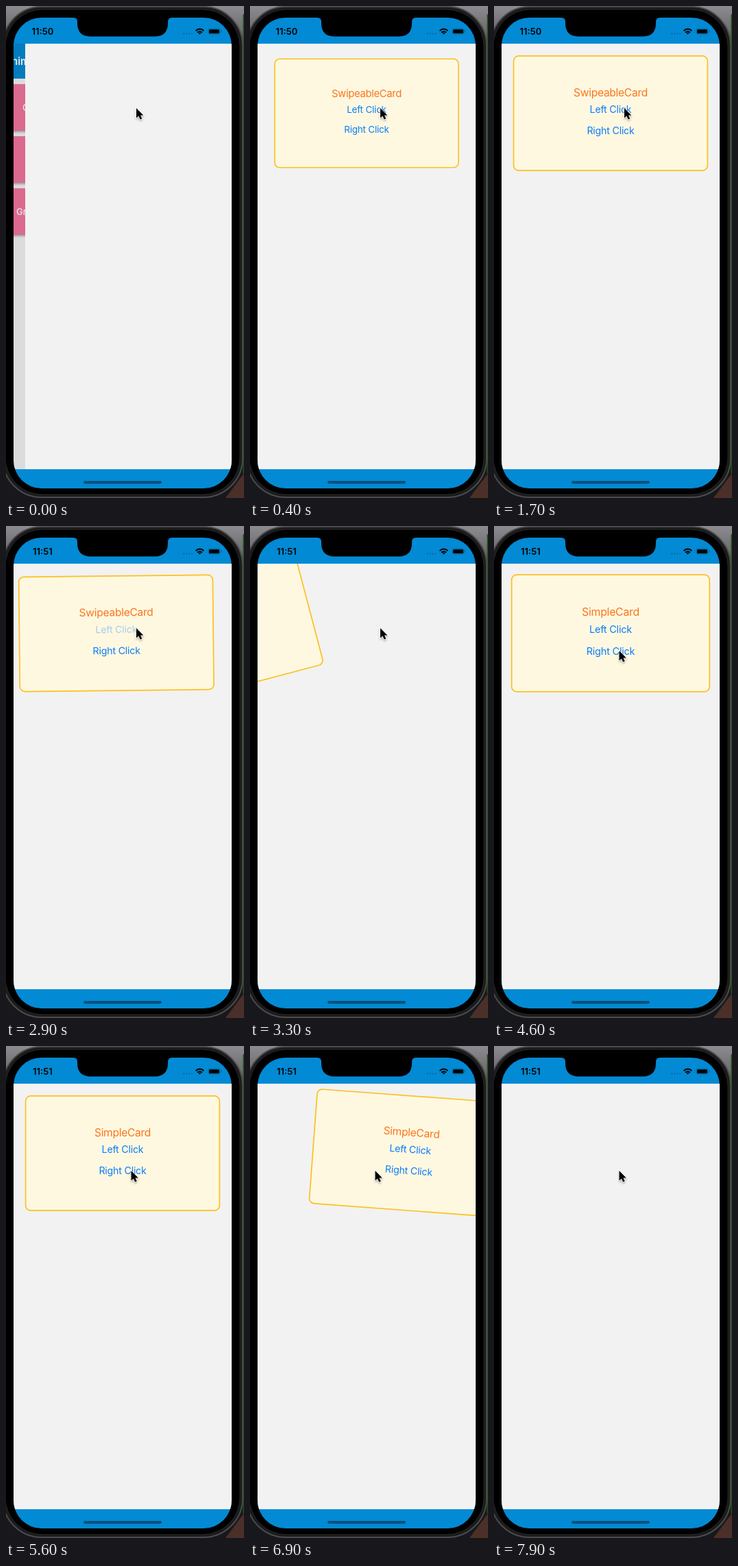
An HTML page for the animation above (8 s loop, 347x718 px).

```html
<!DOCTYPE html>
<html lang="en">
<head>
<meta charset="utf-8">
<title>Swipe cards</title>
<style>
  html, body { margin: 0; width: 100%; height: 100%; overflow: hidden; background: #000; }
  svg { display: block; width: 347px; height: 718px; font-family: Inter, Roboto, sans-serif; }
  #card text { text-anchor: middle; fill: #0a7cfa; font-size: 14.2px; letter-spacing: -.2px; }
  #card #title { fill: #fa761b; font-size: 15.6px; letter-spacing: -.3px; }
  #clock { font-size: 13px; font-weight: 600; text-anchor: middle; }
  #menu text { fill: #e9e9e9; font-weight: 500; font-size: 13px; }
</style>
</head>
<body>
<svg viewBox="0 0 347 718">
  <defs>
    <linearGradient id="backdrop" x2="0" y2="1">
      <stop offset="0" stop-color="#8c8c90"/><stop offset=".08" stop-color="#5a5a5e"/>
      <stop offset=".5" stop-color="#222"/><stop offset="1" stop-color="#17181d"/>
    </linearGradient>
    <clipPath id="screen"><rect x="11" y="17" width="318" height="687" rx="41"/></clipPath>
    <clipPath id="content"><rect x="11" y="55" width="318" height="621"/></clipPath>
    <filter id="shadow" x="-20%" y="-20%" width="140%" height="150%">
      <feDropShadow dx="0" dy="2" stdDeviation="1.5" flood-opacity=".3"/>
    </filter>
  </defs>

  <!-- device -->
  <rect width="347" height="718" fill="url(#backdrop)"/>
  <path d="M347 682V718H320Z" fill="#4a3029"/>
  <rect x="345.5" y="12" width="1.5" height="670" fill="#1f5513"/>
  <rect x="-5" y="1" width="350" height="716" rx="57" fill="#1b1b1c" stroke="#4b4b4d" stroke-width="2"/>
  <rect x="-1" y="5" width="342" height="708" rx="54" stroke="#29292a"/>

  <g clip-path="url(#screen)">
    <rect x="11" y="17" width="318" height="687" fill="#038ad4"/>
    <g clip-path="url(#content)">
      <g id="menu">
        <rect x="11" y="55" width="318" height="621" fill="#dcdcdc"/>
        <rect x="11" y="55" width="318" height="51" fill="#037cbe"/>
        <g fill="#db6b8f" filter="url(#shadow)">
          <rect x="-20" y="114" width="300" height="68"/>
          <rect x="-20" y="190" width="300" height="68"/>
          <rect x="-20" y="266" width="300" height="68"/>
        </g>
        <text x="8" y="86" style="font-size:15px;font-weight:600">nim</text>
        <text x="24" y="153">G</text>
        <text x="15" y="305">Gr</text>
      </g>
      <rect id="page" x="11" y="55" width="318" height="621" fill="#f2f2f2"/>
      <g id="card">
        <rect x="-141.4" y="-83.6" width="282.8" height="167.2" rx="7.5" fill="#fff8e1" stroke="#fcc021" stroke-width="1.7"/>
        <text id="title" y="-25"></text>
        <text id="left" y="-.5">Left Click</text>
        <text id="right" y="30.5">Right Click</text>
      </g>
    </g>
    <text id="clock" x="53.4" y="42"></text>
    <path d="M258 40.5H272" stroke="#0869a0" stroke-width="2" stroke-dasharray="2 2"/>
    <g fill="none" stroke="#000" stroke-width="2">
      <path d="M276.6 36.2Q282.5 30.8 288.4 36.2M279 38.8Q282.5 35.6 286 38.8"/>
      <path d="M280.6 39.6Q282.5 38.3 284.4 39.6L282.5 41.8Z" fill="#000" stroke="none"/>
      <rect x="294.8" y="33" width="17.4" height="8.2" rx="2.6" stroke="#06659a" stroke-width="1"/>
      <rect x="296" y="34.2" width="15" height="5.8" rx="1.5" fill="#000" stroke="none"/>
      <path d="M313.6 35.8V38.6" stroke="#06659a" stroke-width="1"/>
    </g>
    <rect x="113" y="693" width="114" height="4.2" rx="2.1" fill="#07527d"/>
  </g>
  <path d="M98 17Q104 17 104 23V25Q104 44.4 123 44.4H217Q236 44.4 236 25V23Q236 17 242 17V15H98Z"/>
  <path id="pointer" d="M0 0V14.5L3.3 11.4 5.7 16.6 8.3 15.4 6 10.4H10.4Z" stroke="#fff" stroke-width="1.1" paint-order="stroke" filter="url(#shadow)"/>
</svg>

<script>
const $ = id => document.getElementById(id);
const LOOP = 8000, STEP = 100;
const SWIPE_TIME = 1000, SWIPE_DISTANCE = 477, TILT = 0.067;

// Each card springs in at `enter`; a held link sends it off to one side.
const cards = [
  { title: 'SwipeableCard', enter: 203, press: 2500, release: 2823, side: -1 },
  { title: 'SimpleCard', enter: 4213, press: 6350, release: 6674, side: 1 },
  { title: 'SwipeableCard', enter: 7895, press: 1e5, release: 1e5, side: -1 }
];

const clamp = x => Math.min(1, Math.max(0, x));
const quadInOut = x => x < .5 ? 2 * x * x : 1 - 2 * (1 - x) ** 2;

// cubic-bezier(.42, 0, 1, 1)
function ease(x) {
  let lo = 0, hi = 1;
  for (let i = 0; i < 20; i++) {
    const s = (lo + hi) / 2;
    if (1.26 * s + .48 * s * s - .74 * s ** 3 < x) lo = s; else hi = s;
  }
  return 3 * lo * lo - 2 * lo ** 3;
}
const easeInOut = x => x < .5 ? ease(2 * x) / 2 : 1 - ease(2 - 2 * x) / 2;

function spring(ms) {
  const t = ms / 1000, w = 10.45;
  return ms > 500 ? 1 : 1 - Math.exp(-11 * t) * (Math.cos(w * t) + 11 / w * Math.sin(w * t));
}

function linkOpacity(t, card) {
  const faded = t < card.release
    ? quadInOut(clamp((t - card.press) / 100))
    : 1 - quadInOut(clamp((t - card.release) / 250));
  return 1 - .8 * faded;
}

function drawCard(t) {
  const card = cards.findLast(c => t >= c.enter);
  $('card').style.display = card ? '' : 'none';
  if (!card) return;
  const dx = card.side * SWIPE_DISTANCE * easeInOut(clamp((t - card.release) / SWIPE_TIME));
  $('card').setAttribute('transform',
    `translate(${170 + dx} 156.5) rotate(${dx * TILT}) scale(${spring(t - card.enter)})`);
  $('title').textContent = card.title;
  const opacity = linkOpacity(t, card);
  $('left').style.opacity = card.side < 0 ? opacity : 1;
  $('right').style.opacity = card.side > 0 ? opacity : 1;
}

function draw(t) {
  const slide = t < 300 ? 17 * Math.exp(-t / 70) : 0;
  $('page').setAttribute('x', 11 + slide);
  $('menu').style.display = slide ? '' : 'none';
  $('clock').textContent = t < 2600 ? '11:50' : '11:51';
  const move = clamp((t - 3650) / 800);
  $('pointer').setAttribute('transform', `translate(${190 - 7.5 * move} ${149 + 33 * move})`);
  drawCard(t);
}

function frame() {
  draw(Math.floor(performance.now() % LOOP / STEP) * STEP);
  requestAnimationFrame(frame);
}
frame();
</script>
</body>
</html>
```
